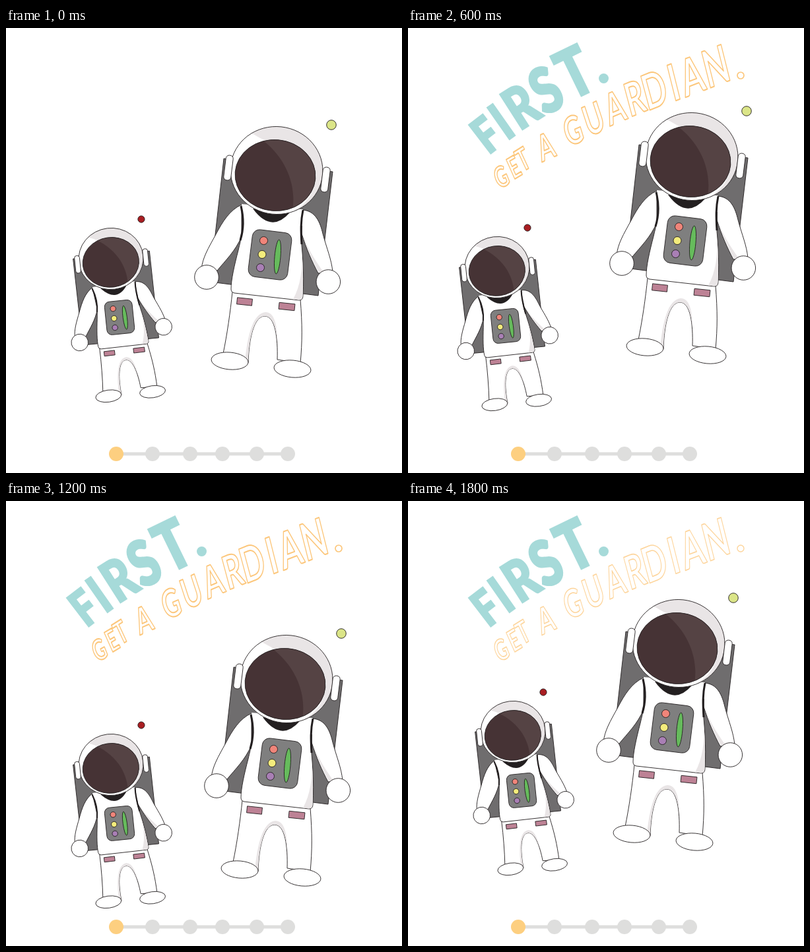
Recreate the animation shown at these times as an HTML page. Size 600 by 675 pixels, loop 1.9 s.

```html
<!DOCTYPE html>
<html lang="en">
<head>
<meta charset="utf-8">
<title>First. Get a guardian.</title>
<style>
  html, body { margin: 0; width: 100%; height: 100%; overflow: hidden; background: #fff; }
  svg { display: block; width: 100%; height: 100%; }
  text { font-family: Lato, "Open Sans", sans-serif; text-anchor: middle; }
  .ink { stroke: #231f20; stroke-width: 0.9; }
  .ink, .ink *, #outline *, #solid text { vector-effect: non-scaling-stroke; }
  #solid { fill: #a6dad9; font-weight: 900; }
  #solid text { stroke: #a6dad9; stroke-width: 2; }
  #outline { fill: #fff; stroke: #fcc67a; stroke-linejoin: round; font-weight: 700; }
</style>
</head>
<body>
<svg viewBox="0 0 600 675" xmlns="http://www.w3.org/2000/svg">
  <defs>
    <clipPath id="helmetClip"><ellipse cx="410" cy="216" rx="70" ry="66.5" transform="rotate(6 410 216)"/></clipPath>
    <clipPath id="visorClip"><ellipse cx="408" cy="223.5" rx="61" ry="54" transform="rotate(5 408 223.5)"/></clipPath>
    <g id="astronaut">
      <g class="ink" fill="#fff">
        <path fill="#6f6d6e" d="M330 198L495 218L473 406L309 385Z"/>
        <circle cx="493" cy="147" r="7.3" fill="currentColor"/>

        <!-- legs -->
        <path d="M343 400L446 412C449 450 449 475 446 508L411 503C412 470 408 437 392 437C376 437 368 470 367 508L329 494C335 465 340 430 343 400Z"/>
        <path fill="#e9e5e6" stroke="none" d="M393 431C374 433 366 466 362 506L367 507C368 470 376 437 392 437C403 437 409 452 411 475C411 448 406 431 393 431Z"/>
        <ellipse cx="339" cy="505" rx="28" ry="13" transform="rotate(5 339 505)"/>
        <ellipse cx="434" cy="517" rx="28" ry="13" transform="rotate(5 434 517)"/>

        <!-- arms -->
        <path d="M357 268C339 276 328 294 318 313C306 335 298 348 296 366L320 368C332 353 348 338 357 316Z"/>
        <path d="M449 276C469 277 476 295 480 312C486 335 493 350 495 370L473 372C464 355 455 335 448 312Z"/>
        <path fill="#e9e5e6" stroke="none" d="M450 314C456 334 465 354 474 371L480 369C467 350 457 335 450 314Z"/>
        <circle cx="304" cy="378" r="18.3"/>
        <circle cx="488.3" cy="385" r="18.3"/>

        <!-- torso -->
        <path d="M357 268C362 300 356 320 352 337C346 360 341 382 341 396Q341 401 346 402L444 413Q450 413 450 406C452 370 449 340 447 318C447 300 447 290 450 275Z"/>
        <path fill="#e9e5e6" stroke="none" d="M448 338C450 365 446 392 435 411.500L444 412.500Q449.500 412 449.500 406C450.500 380 450 358 448 338Z"/>
        <path stroke="none" d="M357 267L450 275L449 300L359 295Z"/>
        <path fill="#231f20" stroke="none" d="M374 274Q402 312 430 280Z"/>
      </g>
      <g fill="none" stroke="#231f20" stroke-width="3">
        <path d="M356 270C361 290 360 306 355 322"/>
        <path d="M450 276C446 295 447 310 448 328"/>
      </g>

      <!-- chest panel and pockets -->
      <g class="ink">
        <rect x="370" y="308" width="60" height="72" rx="11" fill="#7f7f7f" transform="rotate(7 400 344)"/>
        <circle cx="390.500" cy="322.500" r="6" fill="#f0857a"/>
        <circle cx="388" cy="343.500" r="6" fill="#f3ec7c"/>
        <circle cx="385.500" cy="363.500" r="6" fill="#a97fb5"/>
        <ellipse cx="411.500" cy="347" rx="4.500" ry="26" fill="#66bb5c" transform="rotate(5 411.5 347)"/>
        <rect x="350" y="410" width="23" height="10" fill="#bd8295" transform="rotate(6 361.5 415)"/>
        <rect x="413.500" y="417.500" width="24" height="10" fill="#bd8295" transform="rotate(6 425.5 422.5)"/>
      </g>

      <!-- helmet -->
      <ellipse cx="410" cy="216" rx="70" ry="66.5" fill="#fff" transform="rotate(6 410 216)"/>
      <path clip-path="url(#helmetClip)" fill="#e9e5e6" d="M371 159C395 172 425 190 470 222C468 250 455 268 436 277L500 260L490 130L380 140Z"/>
      <g clip-path="url(#visorClip)">
        <path fill="#463335" d="M340 160H480V290H340Z"/>
        <path fill="#554344" d="M370 158C415 182 444 230 433 282H480V158Z"/>
      </g>
      <g class="ink" fill="none">
        <ellipse cx="410" cy="216" rx="70" ry="66.5" transform="rotate(6 410 216)"/>
        <ellipse cx="408" cy="223.5" rx="61" ry="54" transform="rotate(5 408 223.5)"/>
        <rect x="331.500" y="193" width="11" height="38" rx="5" fill="#fff" transform="rotate(7 337 212)"/>
        <rect x="478.500" y="211" width="11" height="38" rx="5" fill="#fff" transform="rotate(7 484 230)"/>
      </g>
    </g>
  </defs>

  <g id="title" visibility="hidden">
    <g id="solid"><circle cx="296.500" cy="76.500" r="7.500"/></g>
    <g id="outline"><circle cx="504" cy="72" r="5"/></g>
  </g>

  <g id="small" color="#a91e22">
    <use href="#astronaut" transform="translate(159 350) rotate(-12.8) scale(.7) translate(-410 -216)"/>
  </g>
  <g id="big" color="#dbe588"><use href="#astronaut"/></g>

  <g id="progress" fill="#dededd"><path d="M167 643.500H427V648.500H167Z"/></g>
</svg>
<script>
const $ = id => document.getElementById(id);
const LOOP = 1900, STEP = 100, LEG = 600;

function add(parent, tag, attrs, text) {
  const el = document.createElementNS("http://www.w3.org/2000/svg", tag);
  for (const key in attrs) el.setAttribute(key, attrs[key]);
  if (text) el.textContent = text;
  parent.appendChild(el);
}

// Each letter: character, baseline centre x and y, angle, cap height.
function letter(parent, skew, condense, [char, x, y, angle, cap]) {
  add(parent, "text", {
    "font-size": cap / 0.72,
    transform: `translate(${x} ${y}) rotate(${angle}) skewY(${skew}) scale(${condense} 1)`
  }, char);
}

[
  ["F", 135, 183, -37.5, 54],
  ["I", 158, 166, -35, 58],
  ["R", 188, 145, -32.5, 63],
  ["S", 225, 124.5, -28, 69],
  ["T", 268.5, 100.5, -26, 74]
].forEach(item => letter($("solid"), 0, 0.77, item));

[
  ["G", 147, 240, -22, 31],
  ["E", 167, 226, -24, 32],
  ["T", 181, 214, -25, 33],
  ["A", 214.5, 198.5, -17, 39],
  ["G", 256, 175, -17, 42],
  ["U", 288, 159, -18, 45],
  ["A", 320, 143, -16, 47],
  ["R", 350, 130, -15, 50],
  ["D", 380, 119, -15, 53],
  ["I", 409, 109, -14, 55],
  ["A", 437, 99, -14, 55],
  ["N", 473, 85, -14, 56]
].forEach(item => letter($("outline"), -7, 0.66, item));

[167, 222, 279, 328, 380, 427].forEach((cx, i) =>
  add($("progress"), "circle", { cx, cy: 646, r: 11, fill: i ? "#dededd" : "#fdcf80" }));

const paths = {
  big: [[0, 0], [20, -21], [15, 54], [0, 0]],
  small: [[0, 0], [-24, 13], [0, 50], [0, 0]]
};
const strength = [0.6, 1, 1, 0.6];

const mix = (a, b, k) => a + (b - a) * k;

function draw(now) {
  const t = Math.floor((now % LOOP) / STEP) * STEP;
  const leg = Math.min(2, Math.floor(t / LEG));
  const k = (t - leg * LEG) / LEG;
  for (const id in paths) {
    const [a, b] = paths[id].slice(leg, leg + 2);
    $(id).setAttribute("transform",
      `translate(${Math.round(mix(a[0], b[0], k))} ${Math.round(mix(a[1], b[1], k))})`);
  }
  const s = mix(strength[leg], strength[leg + 1], k);
  $("title").setAttribute("visibility", t ? "visible" : "hidden");
  $("outline").setAttribute("stroke-width", mix(0.9, 1.7, s));
  $("outline").setAttribute("stroke-opacity", mix(0.4, 1, s));
}

function tick() {
  draw(performance.now());
  requestAnimationFrame(tick);
}
tick();
</script>
</body>
</html>
```
